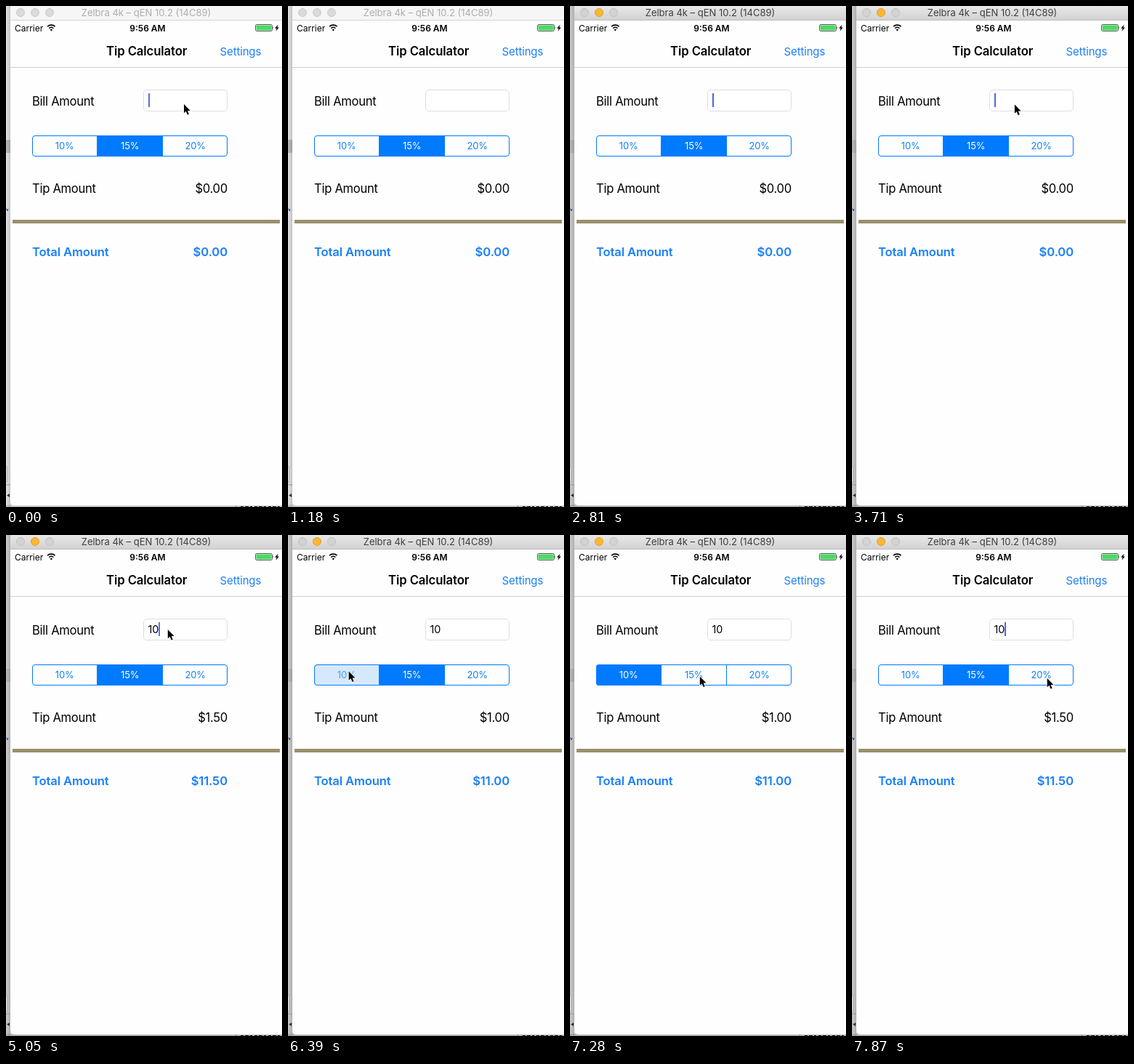
Recreate the animation shown at these times as an HTML page. Size 380x689 px, loop 8000 ms.

```html
<!DOCTYPE html>
<html lang="en">
<head>
<meta charset="utf-8">
<title>Tip Calculator</title>
<style>
  html, body { margin: 0; width: 100%; height: 100%; overflow: hidden; background: #fff; }
  svg { display: block; width: 380px; height: 689px; font-family: Inter, Roboto, "Liberation Sans", sans-serif; }
  text { white-space: pre; }
  .body { font-size: 16.6px; letter-spacing: -.28px; }
  .bold { font-weight: 600; }
  .body.bold { letter-spacing: -.12px; }
  .blue { fill: #1a7ff8; }
  .end { text-anchor: end; }
  .mid { text-anchor: middle; }
  .seg text { font-size: 13px; letter-spacing: -.1px; text-anchor: middle; }
  #strip { fill: #e3e3e3; }
  #bar { fill: #f6f6f6; }
  #edge { stroke: #d4d4d4; }
  #caption { font-size: 13px; fill: #adadad; }
  .light { fill: #dadada; stroke: #cbcbcb; }
  .active #strip { fill: #cbcbcb; }
  .active #bar { fill: url(#chrome); }
  .active #edge { stroke: #bfbfbf; }
  .active #caption { fill: #3f3f3f; }
  .active .light { fill: #d3d3d3; stroke: #c0c0c0; }
  .active .amber { fill: #fdb732; stroke: #e09f30; }
</style>
</head>
<body>
<svg id="stage" viewBox="0 0 380 689">
  <defs>
    <linearGradient id="chrome" x2="0" y2="1">
      <stop stop-color="#e8e8e8"/><stop offset="1" stop-color="#d2d2d2"/>
    </linearGradient>
    <linearGradient id="shade">
      <stop stop-color="#000" stop-opacity="0"/><stop offset="1" stop-color="#000" stop-opacity=".14"/>
    </linearGradient>
    <clipPath id="pill"><rect x="36" y="178" width="269" height="29" rx="4"/></clipPath>
  </defs>

  <!-- desktop behind the window -->
  <rect id="strip" width="380" height="689"/>
  <rect y="184" width="6" height="18" fill="#b9b9b9"/>
  <path d="M0 279h1l1 3 1-3" fill="none" stroke="#3a4fa8"/>
  <path d="M0 633.5h1.5V655H0" fill="#f4f4f4" stroke="#b5b5b5"/>
  <path d="M0 658.5h6" stroke="#a8a8a8"/>
  <path d="M1 673l4-2.5v5z" fill="#333"/>
  <rect width="6" height="689" fill="url(#shade)"/>
  <rect y="686" width="380" height="3" fill="#000" opacity=".13"/>
  <path d="M316.5 687v2" stroke="#777"/>
  <path d="M323 688.5h57" stroke="#111" stroke-dasharray="4 2 5 2 3 3"/>

  <!-- window -->
  <path d="M6 0H380V687H11a5 5 0 0 1-5-5Z" fill="#fefefe"/>
  <rect id="bar" x="6" width="374" height="19"/>
  <path id="edge" d="M6 19.5H380"/>
  <circle class="light" cx="20" cy="9" r="5.5"/>
  <circle class="light amber" cx="40" cy="9" r="5.5"/>
  <circle class="light" cx="60" cy="9" r="5.5"/>
  <text id="caption" class="mid" x="193" y="14">Zelbra 4k – qEN 10.2 (14C89)</text>

  <!-- status bar -->
  <text x="12" y="34.5" font-size="12">Carrier</text>
  <path d="M57 28.3a7.5 7.5 0 0 1 10.6 0M59.2 30.7a4.6 4.6 0 0 1 6.2 0" fill="none" stroke="#000" stroke-width="1.6"/>
  <path d="M60.6 32.4a2.6 2.6 0 0 1 3.4 0L62.3 34.4Z"/>
  <text class="mid bold" x="195" y="34.5" font-size="12">9:56 AM</text>
  <rect x="343.5" y="25.5" width="23" height="9" rx="1.8" fill="#fff" stroke="#333" stroke-width=".8"/>
  <rect x="344.5" y="26.5" width="21" height="7" rx=".8" fill="#4cd964"/>
  <path d="M367.5 28.3q1.6 1.7 0 3.4z" fill="#333"/>
  <path d="M374.6 25.5l-4.3 5.2h2.4l-1.2 4 4.4-5.3h-2.4z"/>

  <!-- navigation -->
  <text class="mid bold" x="193.7" y="68" font-size="16.7" letter-spacing="-.1">Tip Calculator</text>
  <text class="blue" x="294.6" y="67.5" font-size="15" letter-spacing="-.15">Settings</text>
  <path d="M6 84.5H380" stroke="#cfcfcf"/>

  <!-- form -->
  <text class="body" x="36" y="136.5">Bill Amount</text>
  <rect x="189.5" y="115.5" width="115" height="29" rx="4.5" fill="#fff" stroke="#dedede"/>
  <text id="bill" x="195.5" y="135" font-size="14.4"></text>
  <rect id="caret" y="120" width="2" height="19" fill="#4769e0"/>

  <g class="seg">
    <g id="cells" clip-path="url(#pill)"></g>
    <path d="M125.5 178.5v28M215.5 178.5v28" stroke="#007aff"/>
    <rect x="36.5" y="178.5" width="268" height="28" rx="3.5" fill="none" stroke="#007aff"/>
    <g id="labels"></g>
  </g>

  <text class="body" x="36" y="256.5">Tip Amount</text>
  <text id="tip" class="body end" x="305" y="256.5"></text>
  <rect x="9" y="294" width="368" height="5" fill="#99906b"/>
  <text class="body bold blue" x="36" y="344.2">Total Amount</text>
  <text id="total" class="body bold blue end" x="305" y="343.5"></text>

  <path id="mouse" d="M0 0V12.2L2.8 9.7L4.8 14.6L6.9 13.7L4.9 9H8.7Z" stroke="#fff" stroke-width="1.6" paint-order="stroke"/>
</svg>
<script>
const LOOP = 8000, FRAME = 148.4, BLINK = 1040;
const ACTIVE_AT = 2660, CLICK_AT = 3700, TYPED_AT = 4440;
const PRESS = 140;
const RATES = [10, 15, 20];
const PRESSES = [{ at: 6380, cell: 0 }, { at: 7400, cell: 1 }];

const el = id => document.getElementById(id);
const clamp = v => Math.min(1, Math.max(0, v));
const money = n => '$' + n.toFixed(2);

function add(parent, tag, attrs) {
  const node = document.createElementNS('http://www.w3.org/2000/svg', tag);
  for (const key in attrs) node.setAttribute(key, attrs[key]);
  return el(parent).appendChild(node);
}

const cells = RATES.map((r, i) => add('cells', 'rect', { x: 36 + i * 89.5, y: 178, width: 90, height: 29 }));
const labels = RATES.map((r, i) => {
  const label = add('labels', 'text', { x: 80.7 + i * 90, y: 197 });
  label.textContent = r + '%';
  return label;
});

// Each glide goes from the previous rest point to (x, y)
const glides = [
  { from: 0, to: 440, x: 327, y: 134.5 },
  { from: 600, to: 601, x: 228, y: 156 },
  { from: 3500, to: 3800, x: 222.8, y: 130 },
  { from: 5600, to: 6240, x: 83.7, y: 187.5 },
  { from: 6800, to: 7200, x: 178.8, y: 194.5 },
  { from: 7580, to: 7860, x: 268.7, y: 197 }
];

function mouseAt(t) {
  return glides.reduce((p, g) => {
    const u = clamp((t - g.from) / (g.to - g.from));
    const k = u * u * (3 - 2 * u);
    return { x: p.x + (g.x - p.x) * k, y: p.y + (g.y - p.y) * k };
  }, { x: 245, y: 135 });
}

// Blinks off around one point of each period; a click holds it on until typing
function caretAt(t) {
  if (t >= CLICK_AT && t < TYPED_AT) return 1;
  const phase = (t < TYPED_AT ? t : t - TYPED_AT + 440) % BLINK;
  return clamp((Math.abs(phase - 222) - 100) / 130);
}

// The tip follows a press at once, the highlight on release
function choiceAt(t) {
  let selected = 1, pressed = -1, rate = RATES[1];
  for (const { at, cell } of PRESSES) {
    if (t < at) break;
    rate = RATES[cell];
    if (t < at + PRESS) pressed = cell;
    else selected = cell;
  }
  return { selected, pressed, rate };
}

function draw(t) {
  const typed = t >= TYPED_AT, bill = typed ? 10 : 0;
  const { x, y } = mouseAt(t);
  const { selected, pressed, rate } = choiceAt(t);
  const tip = bill * rate / 100;

  el('stage').classList.toggle('active', t >= ACTIVE_AT);
  el('bill').textContent = typed ? '10' : '';
  el('tip').textContent = money(tip);
  el('total').textContent = money(bill + tip);
  el('caret').setAttribute('x', typed ? 210 : 196);
  el('caret').setAttribute('opacity', caretAt(t));
  el('mouse').setAttribute('transform', `translate(${x} ${y})`);
  el('mouse').setAttribute('opacity', t < 580 || t > 3550 ? 1 : 0);
  cells.forEach((cell, i) => {
    const on = i === selected, down = i === pressed;
    cell.setAttribute('fill', on ? '#007aff' : down ? '#d6e8fc' : '#fefefe');
    labels[i].setAttribute('fill', on ? '#fff' : down ? '#4a9df8' : '#0f80fb');
  });
}

const start = performance.now();
function tick() {
  const t = (performance.now() - start) % LOOP;
  draw(Math.floor((t + 16) / FRAME) * FRAME);
  requestAnimationFrame(tick);
}
draw(0);
requestAnimationFrame(tick);
</script>
</body>
</html>
```
